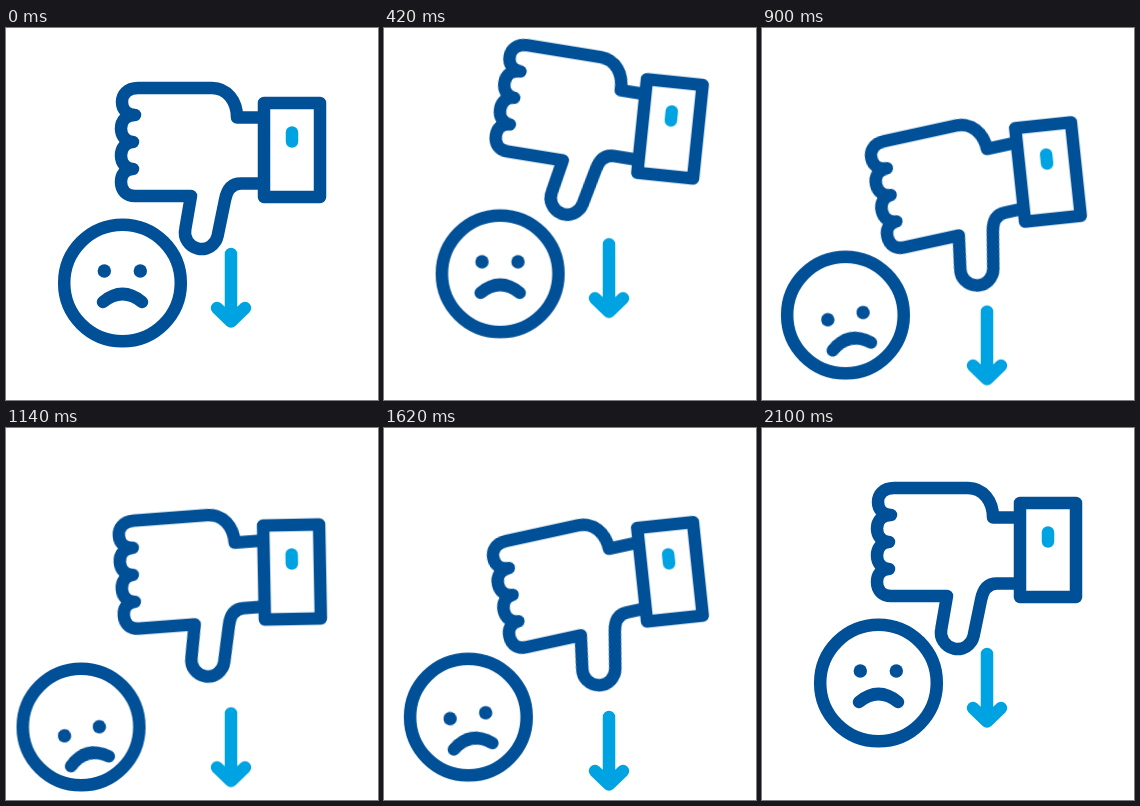
Animation of 372 by 372 pixels, one loop 2250 ms. Source, as an HTML page:

```html
<!DOCTYPE html>
<html lang="en">
<head>
<meta charset="utf-8">
<title>Thumbs down</title>
<style>
  :root {
    --dark: #005097;
    --light: #00a3e1;
    --swing: cubic-bezier(.37, 0, .63, 1);
    --knock: cubic-bezier(.25, .46, .45, .94);
  }
  html, body { margin: 0; width: 100%; height: 100%; overflow: hidden; background: #fff; }
  svg { display: block; width: 100vw; height: 100vh; }
  g {
    fill: none; stroke: var(--dark); stroke-width: 12.5;
    stroke-linecap: round; stroke-linejoin: round;
    animation: 2250ms var(--swing) infinite;
  }
  .light { stroke: var(--light); }
  .eye { fill: var(--dark); stroke: none; }
  #cuff rect { fill: #fff; }

  #arm { animation-name: strike; }
  #hand { animation-name: wrist; transform-origin: 272px 122px; }
  #cuff { animation-name: tilt; transform-origin: 286px 122px; }
  #face { animation-name: shove; }
  #features { animation-name: bow; transform-origin: 116.5px 255px; }
  #arrow { animation-name: drop; }

  /* Wind up, strike, stay down, return. */
  @keyframes strike {
    0%, 6.67%, 93.33%, 100% { transform: translateY(0); }
    23.56% { transform: translateY(-26px); }
    36.6%, 70.67% { transform: translateY(22px); }
  }
  /* The hand swings further than the cuff and trails it. */
  @keyframes wrist {
    0%, 6.67%, 93.33%, 100% { transform: rotate(0); }
    24.44% { transform: rotate(12deg); }
    40%, 72% { transform: rotate(-12.3deg); }
    56% { transform: rotate(-1.7deg); }
  }
  @keyframes tilt {
    0%, 6.67%, 93.33%, 100% { transform: rotate(0); }
    21.78% { transform: rotate(6.5deg); }
    40%, 72% { transform: rotate(-6deg); }
    56% { transform: rotate(.5deg); }
  }
  /* The face rises, is knocked aside and drifts back. */
  @keyframes shove {
    0%, 6.67%, 93.33%, 100% { transform: translate(0, 0); }
    26.67% { transform: translate(-.5px, -14px); }
    29.33% { transform: translate(-.5px, -14px); animation-timing-function: var(--knock); }
    51.1%, 62.22% { transform: translate(-41.5px, 44px); }
  }
  @keyframes bow {
    0%, 93.33%, 100% { transform: rotate(0) translateY(0); }
    29.33% { transform: rotate(0) translateY(0); animation-timing-function: var(--knock); }
    51.1%, 57.33% { transform: rotate(-14.6deg) translateY(16.4px); }
  }
  @keyframes drop {
    0%, 6.67%, 93.33%, 100% { transform: translateY(0); }
    22.22%, 26.67% { transform: translateY(-11px); }
    39.56% { transform: translateY(57.5px); animation-timing-function: linear; }
    72%, 77.33% { transform: translateY(63px); }
  }
</style>
</head>
<body>
<svg viewBox="0 0 372 372">
  <g id="arrow"><path class="light" d="M225 226V293M211 280L225 293.5L239 280"/></g>
  <g id="face">
    <circle cx="116.5" cy="255" r="58.3"/>
    <g id="features">
      <circle class="eye" cx="98.3" cy="243" r="6.7"/>
      <circle class="eye" cx="134.3" cy="243" r="6.7"/>
      <path d="M97 274Q116.5 258 136 274"/>
    </g>
  </g>
  <g id="arm">
    <g id="hand">
      <path d="M258 89.5H231C231 73 221 60 206 60H132
        C121 60 116 67 116 74C116 82 122 87 129 87
        C120 87 115 93 115 100.5S120 114 127 114
        C120 114 115 120 115 127.5S120 141 127 141
        C119 141 115 147 115 154C115 163 121 168 129 168
        H185L179.3 201A16.5 16.5 0 0 0 211.6 208L219 172Q222 155.5 235 155.5H258"/>
    </g>
    <g id="cuff">
      <rect x="258" y="75" width="56" height="94"/>
      <path class="light" d="M286 104.5V113.5"/>
    </g>
  </g>
</svg>
</body>
</html>
```
